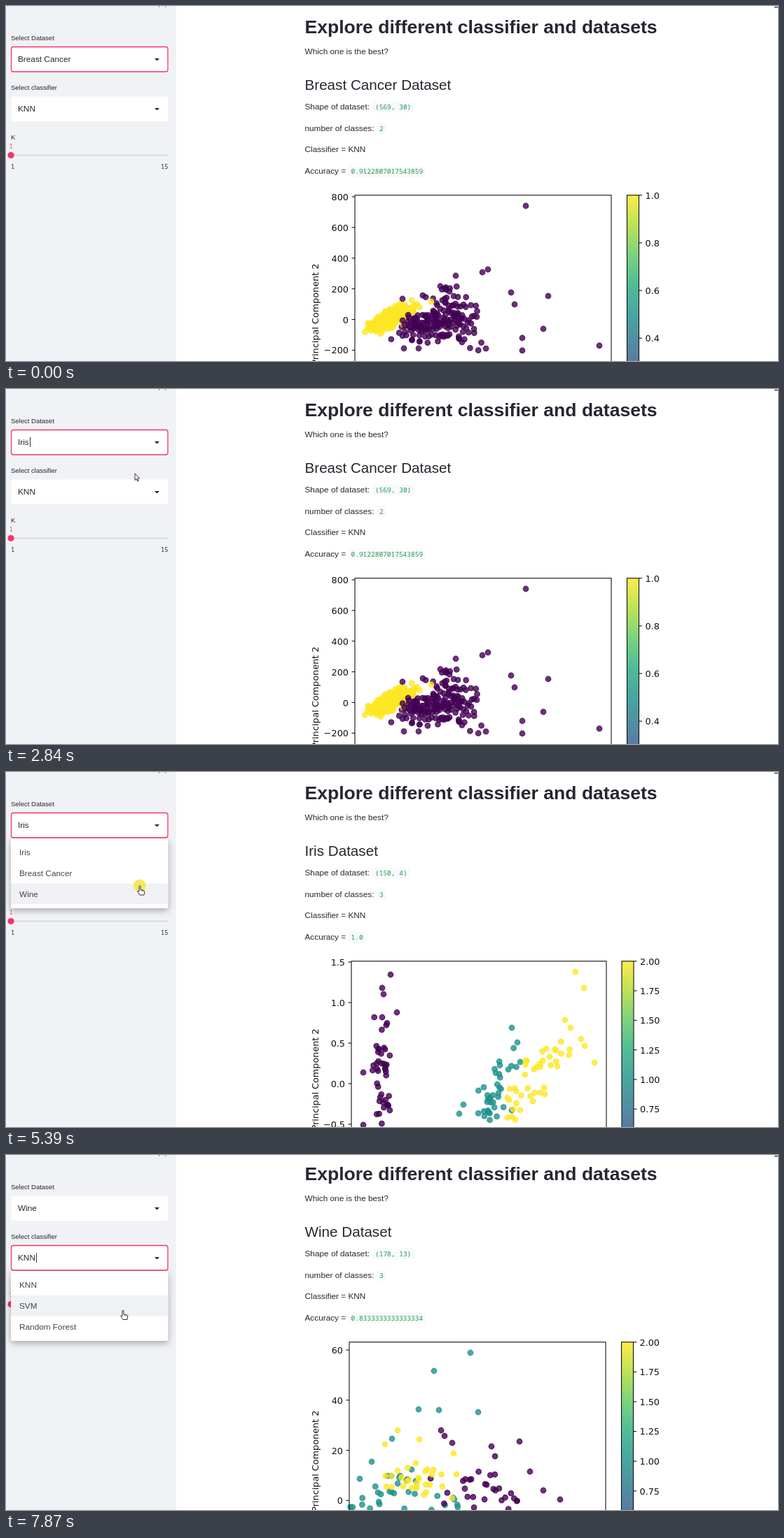
Write an HTML page with a canvas that moves like this. It is 1102 px wide and 508 px high and loops after 8 s.

```html
<!DOCTYPE html>
<html>
<head>
<meta charset="utf-8">
<style>
html, body { margin: 0; overflow: hidden; background: #fff; }
canvas { display: block; }
</style>
</head>
<body>
<canvas id="stage" width="1102" height="508"></canvas>
<script>
const ctx = document.getElementById('stage').getContext('2d');
const LOOP = 8000;
const SANS = '"Liberation Sans", Arial, sans-serif';
const MONO = '"Noto Sans Mono", monospace';
const PLOT = '"DejaVu Sans", sans-serif';
const PINK = '#f63366', INK = '#262730', AXIS = '#111';
const PURPLE = '#440154', TEAL = '#21918c', YELLOW = '#fde725';
const VIRIDIS = [YELLOW, '#addc30', '#5ec962', '#28ae80', TEAL, '#2c728e', '#3b528b', '#472d7b', PURPLE];

// ---- scatter data: seeded clouds plus a few outliers ----
let seed = 7;
const random = () => (seed = (seed * 16807) % 2147483647) / 2147483647;
const gauss = () => (random() + random() + random() + random() - 2) * 1.73;

function cloud(color, count, cx, cy, sx, sy, slope = 0) {
  return Array.from({ length: count }, () => {
    const dx = gauss() * sx;
    return { color, x: cx + dx, y: cy + slope * dx + gauss() * sy };
  });
}
const outliers = (color, ...points) => points.map(([x, y]) => ({ color, x, y }));

const charts = {
  cancer: {
    left: 498, width: 366, top: 270.7, height: 341, bar: 886.5,
    ticks: ['800', '600', '400', '200', '0', '−200'], tickTop: 273, tickStep: 43.9,
    barTicks: 5, digits: 1, barMax: 1,
    points: [
      cloud(PURPLE, 85, 602, 452, 20, 13, -0.1),
      cloud(PURPLE, 75, 637, 440, 18, 16, 0.15),
      cloud(PURPLE, 12, 670, 468, 35, 16),
      cloud(YELLOW, 280, 551, 446, 14, 6, -0.48),
      cloud(YELLOW, 30, 530, 459, 8, 4, -0.3),
      cloud(PURPLE, 18, 580, 453, 8, 7),
      outliers(YELLOW, [607, 423], [579, 421], [535, 469]),
      outliers(PURPLE, [742, 286], [688, 377], [680, 381], [642, 386], [620, 401], [566, 419], [721, 410],
        [774, 415], [726, 427], [767, 462], [737, 475], [737, 493], [847, 486], [568, 490], [589, 490])
    ].flat()
  },
  iris: {
    left: 493, width: 364, top: 270.7, height: 338.5, bar: 879,
    ticks: ['1.5', '1.0', '0.5', '0.0', '−0.5'], tickTop: 272, tickStep: 58,
    barTicks: 8, digits: 2, barMax: 2,
    points: [
      cloud(PURPLE, 42, 538, 428, 7.5, 42),
      outliers(PURPLE, [549, 290], [537, 309], [539, 318], [537, 351], [558, 344], [510, 430], [510, 505]),
      cloud(TEAL, 40, 694, 466, 15, 20, -1.5),
      outliers(TEAL, [722, 366], [730, 387], [734, 415], [653, 476], [647, 489], [722, 484]),
      cloud(YELLOW, 18, 772, 411, 16, 10, -0.4),
      cloud(YELLOW, 22, 745, 455, 16, 22, -0.3),
      outliers(YELLOW, [813, 286], [825, 309], [798, 355], [806, 366], [821, 382], [826, 392], [840, 416])
    ].flat()
  },
  wine: {
    left: 490, width: 366, top: 267.7, height: 341, bar: 878.5,
    ticks: ['60', '40', '20', '0'], tickTop: 279, tickStep: 71.8,
    barTicks: 8, digits: 2, barMax: 2,
    points: [
      cloud(TEAL, 26, 546, 481, 22, 19),
      cloud(TEAL, 10, 612, 492, 22, 13),
      outliers(TEAL, [663, 283], [611, 309], [589, 364], [618, 365], [674, 368], [551, 406], [522, 439]),
      cloud(PURPLE, 30, 682, 476, 36, 20, 0.1),
      outliers(PURPLE, [621, 394], [626, 402], [637, 412], [733, 410], [693, 417], [748, 453], [767, 480], [791, 493]),
      cloud(YELLOW, 27, 584, 470, 19, 20),
      outliers(YELLOW, [559, 394], [590, 407], [541, 414], [639, 427], [643, 457], [637, 491])
    ].flat()
  }
};

const reports = {
  cancer: ['Breast Cancer', '(569, 30)', '2', '0.9122807017543859'],
  iris: ['Iris', '(150, 4)', '3', '1.0'],
  wine: ['Wine', '(178, 13)', '3', '0.8333333333333334']
};

// ---- timeline (ms) ----
const moves = [
  { from: 120, to: 360, x: 371, y: 234 },
  { from: 520, to: 990, x: 180, y: 94 },
  { from: 1370, to: 1530, x: 184, y: 82 },
  { from: 1820, to: 2110, x: 184, y: 121 },
  { from: 3070, to: 3600, x: 199, y: 77 },
  { from: 4540, to: 4860, x: 191, y: 162.5 },
  { from: 5770, to: 6250, x: 189, y: 148 },
  { from: 7270, to: 7640, x: 167, y: 222 }
];
const clicks = [[1530, 1750], [2600, 2760], [3920, 4150], [5390, 5460], [6640, 6860]];
const carets = [[1600, 2130], [2600, 3150], [4000, 4100], [4630, 5160], [5460, 5990], [6810, 7340], [7870, LOOP]];
const runs = [[3150, 3850], [5840, 6560]];
const datasetNames = Object.values(reports).map(r => r[0]);
const datasetItems = [datasetNames[1], datasetNames[0], datasetNames[2]];
const menus = [
  { from: 1600, to: 2760, box: 58, items: datasetItems },
  { from: 4000, to: 5460, box: 58, items: datasetItems },
  { from: 6720, to: LOOP, box: 129, items: ['KNN', 'SVM', 'Random Forest'] }
];
const within = (t, spans) => spans.some(([a, b]) => t >= a && t < b);
const pick = (t, a, b) => t < a ? 'cancer' : t < b ? 'iris' : 'wine';

function pointerAt(t) {
  let x = 950, y = 320;
  for (const m of moves) {
    const u = Math.min(1, Math.max(0, (t - m.from) / (m.to - m.from)));
    const k = u * u * (3 - 2 * u);
    x += (m.x - x) * k;
    y += (m.y - y) * k;
  }
  return { x, y };
}

// ---- drawing helpers ----
function text(str, x, y, size, color = INK, font = SANS, align = 'left', weight = '') {
  ctx.font = `${weight} ${size}px ${font}`;
  ctx.fillStyle = color;
  ctx.textAlign = align;
  ctx.fillText(str, x, y);
}
function rect(x, y, w, h, color) {
  ctx.fillStyle = color;
  ctx.fillRect(x, y, w, h);
}
function rounded(x, y, w, h, r, fill, stroke, width = 1) {
  ctx.beginPath();
  ctx.roundRect(x, y, w, h, r);
  if (fill) { ctx.fillStyle = fill; ctx.fill(); }
  if (stroke) { ctx.strokeStyle = stroke; ctx.lineWidth = width; ctx.stroke(); }
}
function disc(x, y, r, color) {
  ctx.beginPath();
  ctx.arc(x, y, r, 0, 7);
  ctx.fillStyle = color;
  ctx.fill();
}
function lines(color, width, ...paths) {
  ctx.strokeStyle = color;
  ctx.lineWidth = width;
  ctx.beginPath();
  for (const p of paths) {
    ctx.moveTo(p[0], p[1]);
    for (let i = 2; i < p.length; i += 2) ctx.lineTo(p[i], p[i + 1]);
  }
  ctx.stroke();
}
function outlined(shape) {
  const path = new Path2D(shape);
  ctx.fillStyle = '#fff';
  ctx.fill(path);
  ctx.strokeStyle = '#333';
  ctx.lineWidth = 1;
  ctx.stroke(path);
}

function drawChart(c) {
  ctx.globalAlpha = 0.8;
  ctx.lineWidth = 1.2;
  for (const { color, x, y } of c.points) {
    ctx.strokeStyle = color;
    disc(x, y, 3.8, color);
    ctx.stroke();
  }
  const ramp = ctx.createLinearGradient(0, c.top, 0, c.top + c.height);
  VIRIDIS.forEach((color, i) => ramp.addColorStop(i / 8, color));
  rect(c.bar, c.top, 17, c.height, ramp);
  // translucent bands overlap slightly, leaving faint stripes
  ctx.globalAlpha = 0.25;
  for (let y = 0; y < c.height; y += c.height / 128) rect(c.bar, c.top + y, 17, 1, ramp);
  ctx.globalAlpha = 1;

  ctx.strokeStyle = AXIS;
  ctx.lineWidth = 1.1;
  ctx.strokeRect(c.left, c.top, c.width, c.height);
  ctx.strokeRect(c.bar, c.top, 17, c.height);
  c.ticks.forEach((label, i) => {
    const y = c.tickTop + i * c.tickStep;
    lines(AXIS, 1.1, [c.left - 4.5, y, c.left, y]);
    text(label, c.left - 9, y + 4.9, 12.8, AXIS, PLOT, 'right');
  });
  for (let i = 0; i <= c.barTicks; i++) {
    const y = c.top + i * c.height / c.barTicks;
    lines(AXIS, 1.1, [c.bar + 17, y, c.bar + 21.5, y]);
    text((c.barMax * (1 - i / c.barTicks)).toFixed(c.digits), c.bar + 26, y + 4.9, 12.8, AXIS, PLOT);
  }
  ctx.save();
  ctx.translate(445.5, c.top + c.height / 2);
  ctx.rotate(-Math.PI / 2);
  text('Principal Component 2', 0, 0, 12.8, AXIS, PLOT, 'center');
  ctx.restore();
}

function drawReport([name, shape, classes, accuracy]) {
  text('Explore different classifier and datasets', 426.5, 38.5, 26.55, INK, SANS, 'left', 'bold');
  text('Which one is the best?', 426.5, 69, 11.8);
  text(name + ' Dataset', 426.5, 120, 20.65);
  const row = (label, y, value, x) => {
    text(label, 426.5, y, 11.8);
    if (!value) return;
    rounded(x - 4, y - 11.5, value.length * 5.7 + 8, 16, 3, '#f8f9fb');
    text(value, x, y, 9.5, '#1f9a48', MONO);
  };
  row('Shape of dataset:', 148, shape, 527);
  row('number of classes:', 178.5, classes, 533);
  row('Classifier = KNN', 209);
  row('Accuracy =', 240, accuracy, 492.5);
}

function drawSelect(label, value, y, focused, caret) {
  text(label, 7, y - 9, 9.5);
  rounded(7.5, y + 0.5, 223.5, 35.5, 3, '#fff', focused && PINK, 1.3);
  text(value, 17, y + 22.3, 11.8);
  if (focused && caret) {
    const x = Math.round(17 + ctx.measureText(value).width) + 1;
    rect(x, y + 11, 1, 14, '#333');
  }
  ctx.fillStyle = INK;
  ctx.fill(new Path2D(`M212 ${y + 17}h7l-3.5 3.5z`));
}

function drawSlider() {
  text('K', 7, 191, 9.5);
  rect(7, 212.3, 224, 2.4, '#dcdee3');
  disc(7, 213.5, 4.6, PINK);
  text('1', 7, 204, 8.7, '#e8455e', MONO, 'center');
  text('1', 7, 232.5, 8.7, INK, MONO);
  text('15', 231.5, 232.5, 8.7, INK, MONO, 'right');
}

const rowUnder = (menu, p) => Math.floor((p.y - menu.box - 42.4) / 29.6);

function drawMenu(menu, t, selected, p) {
  const top = menu.box + 37;
  ctx.save();
  ctx.globalAlpha = Math.min(1, (t - menu.from) / 150);
  ctx.shadowColor = 'rgba(0,0,0,.32)';
  ctx.shadowBlur = 10;
  ctx.shadowOffsetY = 3;
  rounded(7, top, 224.5, 100, 3, '#fff');
  ctx.shadowColor = 'transparent';
  const hover = rowUnder(menu, p);
  menu.items.forEach((item, i) => {
    const y = top + 5.4 + i * 29.6;
    if (hover >= 0 ? i === hover : item === selected) rect(7, y, 224.5, 29.6, '#f0f1f5');
    text(item, 19, y + 18.9, 11.8, '#43444c');
  });
  ctx.restore();
}

function drawRunning(t) {
  if (Math.floor(t / 240) % 2) {
    lines('#999', 1.3, [955, 0, 960, 1.5, 960, 3.5, 954, 3.5], [963, 0, 963, 5.5]);
  } else {
    rounded(952, -3.2, 8, 8, 4, null, '#999', 1.1);
    rounded(962.5, -3.2, 8, 8, 4, null, '#999', 1.1);
    lines('#999', 1.1, [958, 0, 964, 0]);
  }
  text('RUNNING...', 976, 2.8, 9.4, '#b4b5ba');
  rounded(1035, -14, 47, 22, 3, '#fff', '#dfe0e4');
  text('Stop', 1048.5, 2.2, 9.4, '#55565e');
}

function drawPointer(p, menu) {
  const overMenu = menu && rowUnder(menu, p) >= 0;
  const overBox = p.x < 231 && [58, 129].some(y => p.y > y - 1 && p.y < y + 37);
  ctx.save();
  ctx.translate(p.x, p.y);
  ctx.lineJoin = 'round';
  if (overMenu) {
    outlined('M-1 1Q0-.8 1 1V6L5.5 7Q7 7.4 6.8 9L6 13.5H0L-3.2 8.5Q-3 6.8-1 8.5Z');
    lines('#333', 0.7, [2.8, 6.6, 2.8, 8.6], [4.7, 7, 4.7, 8.8]);
  } else if (overBox) {
    const serif = y => [-3, y, -0.8, y, 0, y * 0.88, 0.8, y, 3, y];
    lines('#444', 1, serif(-5), [0, -4.4, 0, 4.4], serif(5));
  } else {
    outlined('M0 0V9.6L2.2 7.6L3.7 11L5.2 10.3L3.8 7.1L6.6 6.8Z');
  }
  ctx.restore();
}

function draw(t) {
  const p = pointerAt(t);
  const menu = menus.find(m => t >= m.from && t < m.to);
  const caret = within(t, carets);
  const dataset = reports[pick(t, 2740, 5460)][0];
  const onClassifier = t >= 6640;

  rect(0, 0, 1102, 508, '#fff');
  drawChart(charts[pick(t, 3600, 6480)]);
  ctx.save();
  if (t >= 6480) ctx.translate(0, -3);
  drawReport(reports[pick(t, 3220, 5910)]);
  ctx.restore();
  if (within(t, runs)) drawRunning(t);
  rect(1097, 1, 5, 1.3, INK);

  rect(0, 0, 243, 508, '#f0f2f6');
  lines('#8a8b93', 1.2, [218, 1.5, 220.5, -1], [226, -1, 228.5, 1.5]);
  drawSelect('Select Dataset', dataset, 58, !onClassifier, caret);
  drawSelect('Select classifier', 'KNN', 129, onClassifier, caret);
  drawSlider();
  if (menu) drawMenu(menu, t, onClassifier ? 'KNN' : dataset, p);

  if (t >= 120) {
    if (within(t, clicks)) disc(p.x, p.y, 9, 'rgba(240,228,40,.75)');
    drawPointer(p, menu);
  }
}

const start = performance.now();
function frame() {
  draw((performance.now() - start) % LOOP);
  requestAnimationFrame(frame);
}
frame();
</script>
</body>
</html>
```
